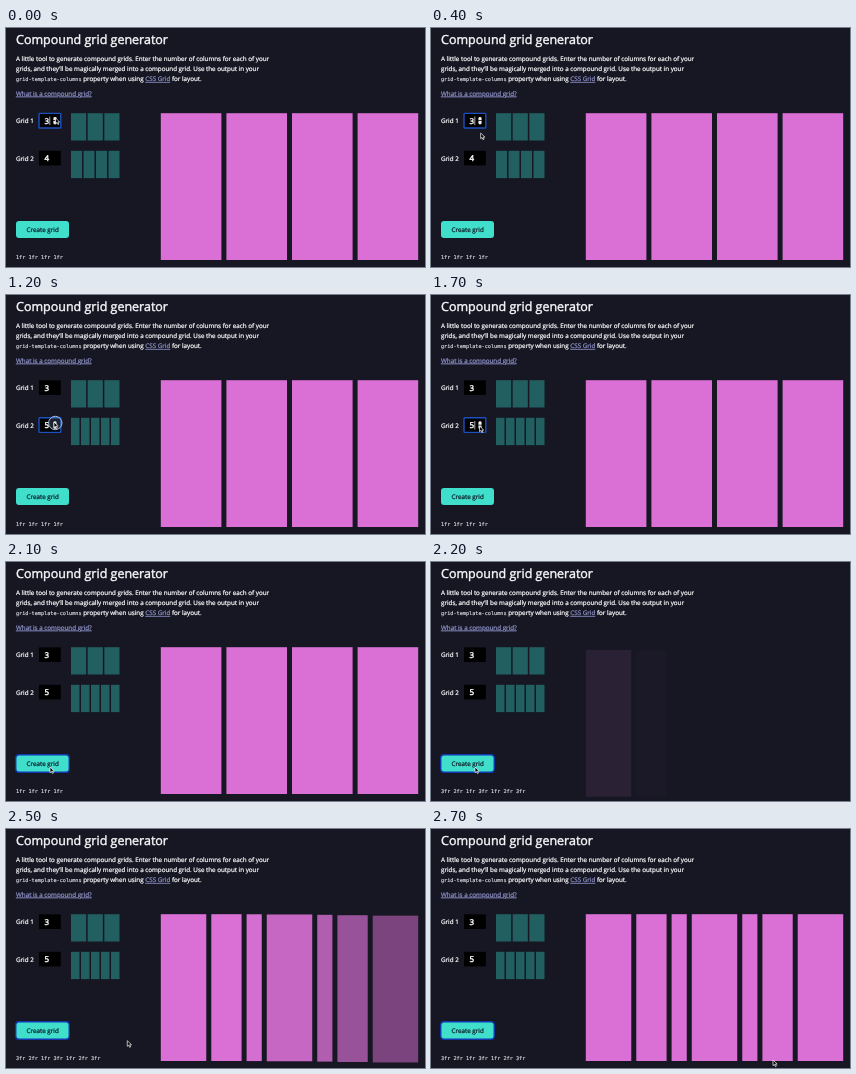
An HTML page that plays this animation: 419x239 px, repeating every 2800 ms.

```html
<!DOCTYPE html>
<html lang="en">
<head>
<meta charset="utf-8">
<title>Compound grid generator</title>
<style>
  html, body { margin: 0; width: 100%; height: 100%; overflow: hidden; background: #161722; }
  svg { display: block; width: 419px; height: 239px; }
  text {
    font: 400 6.28px "Open Sans", "Noto Sans", sans-serif;
    fill: #f8f8fb; stroke: #f8f8fb; stroke-width: .24;
    text-rendering: geometricPrecision; white-space: pre;
  }
  .title { font-size: 12.5px; stroke-width: .42; }
  .mono { font: 400 5.2px "DejaVu Sans Mono", monospace; fill: #dcdce4; stroke: #dcdce4; stroke-width: .15; }
  .link { fill: #8b8fc4; stroke: #8b8fc4; text-decoration: underline; }
  .value { font-size: 8px; stroke-width: .45; }
  .mini { fill: #225f60; }
  .bar { fill: #da70d6; }
  .button { fill: #40dfcc; }
  .button-text { fill: #10202c; stroke: #10202c; text-anchor: middle; }
  .focus { fill: none; stroke: #1c50c0; stroke-width: 1.4; }
  #buttonFocus { stroke: #1238b0; }
  .spin { fill: #f2f2f2; }
  .ring { fill: #8ab0e033; stroke: #a9bddb; stroke-width: 1; }
  .cursor { fill: #000; stroke: #fff; stroke-width: .7; stroke-linejoin: round; }
</style>
</head>
<body>
<svg viewBox="0 0 419 239">
  <text class="title" x="10" y="16">Compound grid generator</text>
  <text x="10" y="33">A little tool to generate compound grids. Enter the number of columns for each of your</text>
  <text x="10" y="43">grids, and they’ll be magically merged into a compound grid. Use the output in your</text>
  <text x="10" y="53"><tspan class="mono">grid-template-columns</tspan> property when using <tspan class="link">CSS Grid</tspan> for layout.</text>
  <text class="link" x="10" y="67.5">What is a compound grid?</text>
  <g id="fields"></g>
  <g id="minis"></g>
  <rect class="button" x="10" y="193" width="53" height="17" rx="3"/>
  <rect class="focus" id="buttonFocus" x="9.75" y="192.75" width="53.5" height="17.5" rx="3.2"/>
  <text class="button-text" x="36.7" y="203.7">Create grid</text>
  <text class="mono" id="output" x="10" y="231"></text>
  <g id="bars"></g>
  <circle class="ring" id="ring" r="6.7"/>
  <path class="cursor" id="cursor" d="M0 0V5.6L1.4 4.4L2.4 6.6L3.4 6.1L2.4 4H4.2Z"/>
</svg>
<script>
const LOOP = 2800, STEP = 100;
const PICK = 1100, PRESS = 2100, BUILD = 2134;
const FADE = 330, STAGGER = 33, DROP = 3;
const OLD = [1, 1, 1, 1], MERGED = [3, 2, 1, 3, 1, 2, 3];
// time, x, y
const PATH = [[0, 49.5, 90], [200, 49.5, 91], [700, 50, 131], [1000, 49.5, 130], [1200, 48, 127],
  [1700, 48.5, 131], [1800, 48, 132], [2100, 44, 205], [2400, 44, 205], [2700, 342, 231], [2800, 342, 231]];

const $ = id => document.getElementById(id);
const show = (el, on) => el.setAttribute("visibility", on ? "visible" : "hidden");
const smooth = p => { p = Math.min(1, Math.max(0, p)); return p * p * (3 - 2 * p); };

function add(parent, tag, attrs, text = "") {
  const el = document.createElementNS("http://www.w3.org/2000/svg", tag);
  for (const key in attrs) el.setAttribute(key, attrs[key]);
  el.textContent = text;
  parent.append(el);
  return el;
}

function columns(parent, cls, tracks, x, y, width, height, gap) {
  const g = add(parent, "g", {});
  const fr = (width - gap * (tracks.length - 1)) / tracks.reduce((a, b) => a + b);
  const rects = tracks.map(n => {
    const el = add(g, "rect", { class: cls, x, y, width: n * fr, height });
    x += n * fr + gap;
    return el;
  });
  return { g, rects };
}

function field(y, name) {
  const box = $("fields");
  add(box, "text", { x: 10, y: y + 10 }, name);
  add(box, "rect", { x: 33, y, width: 21.8, height: 14.6 });
  return {
    value: add(box, "text", { class: "value", x: 38.4, y: y + 10.2 }),
    focus: add(box, "rect", { class: "focus", x: 33, y, width: 21.8, height: 14.6, rx: .8 }),
    caret: add(box, "rect", { class: "spin", x: 43.5, y: y + 3.2, width: .7, height: 8.5 }),
    spin: add(box, "path", { class: "spin",
      d: `M47.4 ${y + 6.9}v-2q0-1.4 1.6-1.4t1.6 1.4v2zm0 .8v2q0 1.4 1.6 1.4t1.6-1.4v-2z` })
  };
}

function setField(f, value, focused, caret, spin) {
  f.value.textContent = value;
  show(f.focus, focused);
  show(f.caret, caret);
  show(f.spin, spin);
}

const first = field(85.4, "Grid 1"), second = field(122.8, "Grid 2");
const mini = (n, y) => columns($("minis"), "mini", Array(n).fill(1), 65, y, 48.5, 27.3, 1.5);
const bars = tracks => columns($("bars"), "bar", tracks, 154.8, 85.2, 257.4, 146.8, 5);
mini(3, 85.2);
const four = mini(4, 122.8), five = mini(5, 122.8);
const before = bars(OLD), after = bars(MERGED);
const template = tracks => tracks.map(n => n + "fr").join(" ");

function cursorAt(t) {
  const i = PATH.findIndex(k => k[0] > t);
  const [t0, x0, y0] = PATH[i - 1], [t1, x1, y1] = PATH[i];
  const p = smooth((t - t0) / (t1 - t0));
  return [x0 + (x1 - x0) * p, y0 + (y1 - y0) * p];
}

function render(t) {
  const picked = t >= PICK, pressed = t >= PRESS, built = t >= BUILD;
  const [x, y] = cursorAt(t);
  const over = top => x < 56 && y >= top && y < top + 15;

  setField(first, 3, !picked, t < 500, !picked || over(85));
  setField(second, picked ? 5 : 4, picked && !pressed, t > 1200 && t < 1800, (picked && !pressed) || over(123));
  show(four.g, !picked);
  show(five.g, picked);
  show($("buttonFocus"), pressed);
  $("output").textContent = template(built ? MERGED : OLD);

  show(before.g, !built);
  after.rects.forEach((el, i) => {
    const p = smooth((t - BUILD - i * STAGGER) / FADE);
    el.setAttribute("opacity", p);
    el.setAttribute("transform", `translate(0 ${DROP * (1 - p)})`);
  });

  $("cursor").setAttribute("transform", `translate(${x} ${y})`);
  $("ring").setAttribute("transform", `translate(${x + 1.3} ${y + 1})`);
  show($("ring"), picked && t <= 1200);
}

function tick() {
  render(Math.floor(performance.now() % LOOP / STEP) * STEP);
  requestAnimationFrame(tick);
}
tick();
</script>
</body>
</html>
```
